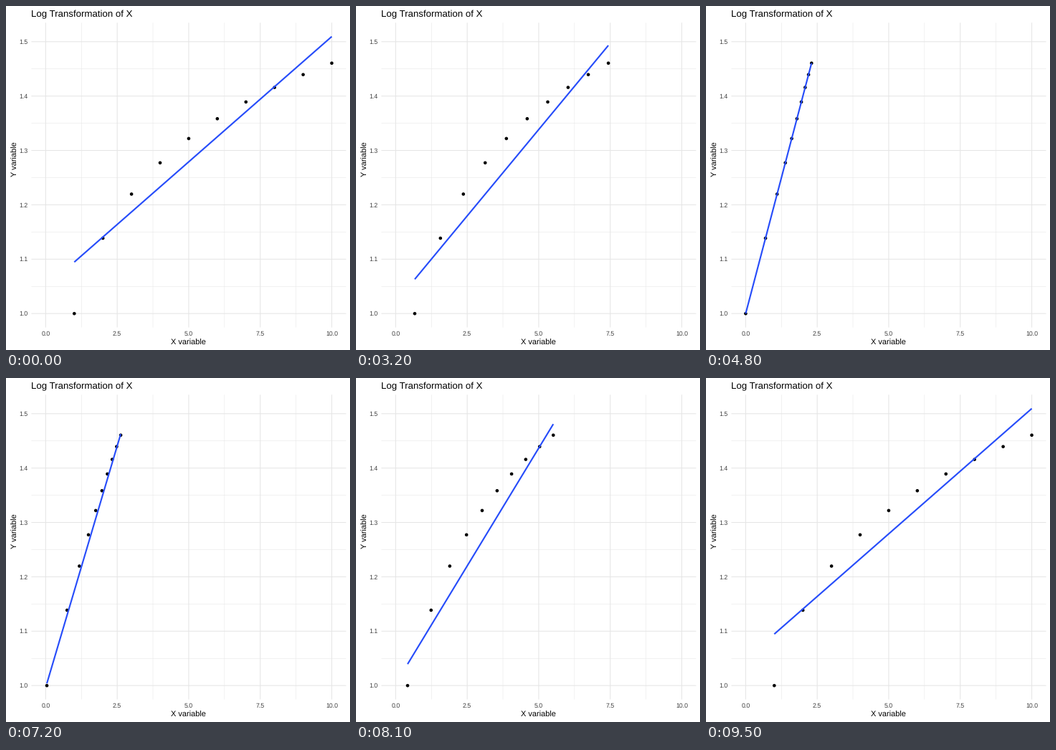
Animation of 480x480 px, one loop 10 s. Source, as a matplotlib script:

```python
import numpy as np
import matplotlib.pyplot as plt
from matplotlib.animation import FuncAnimation
from matplotlib.patches import Circle

SIZE, DPI = 480, 72
FRAMES, INTERVAL, STEPS = 100, 100, 24
LEFT, RIGHT, TOP, BOTTOM = 35.4, 474.5, 23.3, 448.5
BLUE, GRID, TICK = "#264cfa", "#e6e6e6", "#404040"

plt.rcParams["font.family"] = "Liberation Sans"
plt.rcParams["text.hinting"] = "none"

# Data: y is linear in log(x)
raw_x = np.arange(1, 11)
log_x = np.log(raw_x)
y = 1 + 0.2 * log_x
slope, intercept = np.polyfit(raw_x, y, 1)
raw_fit = intercept + slope * raw_x[[0, -1]]
log_fit = y[[0, -1]]


def px(v):
    pad = (RIGHT - LEFT) / 22
    return LEFT + pad + np.asarray(v) / 10 * 20 * pad


def py(v):
    pad = (BOTTOM - TOP) / 22
    return BOTTOM - pad - (np.asarray(v) - 1) / (raw_fit[1] - 1) * 20 * pad


fig = plt.figure(figsize=(SIZE / DPI, SIZE / DPI), dpi=DPI, facecolor="white")
ax = fig.add_axes([0, 0, 1, 1])
ax.set_xlim(0, SIZE)
ax.set_ylim(SIZE, 0)
ax.axis("off")


def grid_line(xs, ys, width):
    ax.plot(xs, ys, color=GRID, lw=width, snap=False,
            solid_capstyle="butt", zorder=1)


def label(x, y, text, size, color="black", ha="center", **kw):
    ax.text(x, y, text, fontsize=size, color=color, ha=ha, va="baseline", **kw)


def grid(xs, ys, width):
    for v in xs:
        grid_line([px(v)] * 2, [TOP, BOTTOM], width)
    for v in ys:
        grid_line([LEFT, RIGHT], [py(v)] * 2, width)


x_ticks = np.arange(0, 10.1, 2.5)
y_ticks = np.linspace(1, 1.5, 6)
grid(x_ticks[:-1] + 1.25, y_ticks[:-1] + 0.05, 0.53)
grid(x_ticks, y_ticks, 1.07)

for v in x_ticks:
    label(px(v), 459.8, f"{v:.1f}", 8.8, TICK)
for v in y_ticks:
    label(30.5, py(v) + 3.15, f"{v:.1f}", 8.8, TICK, ha="right")

label(LEFT, 15, "Log Transformation of X", 13.2, ha="left")
label((LEFT + RIGHT) / 2, 472.5, "X variable", 11)
label(13.2, (TOP + BOTTOM) / 2, "Y variable", 11, rotation=90)

dots = [ax.add_patch(Circle((0, 0), 2.3, fc="black", lw=0, snap=False, zorder=2))
        for _ in raw_x]
fit, = ax.plot([], [], color=BLUE, lw=2.13, snap=False,
               solid_capstyle="butt", zorder=3)


def ramp(i, start):
    return min(max((i - start) / STEPS, 0), 1)


def update(i):
    t = ramp(i, 24) - ramp(i, 71)
    xs = px(raw_x + (log_x - raw_x) * t)
    for dot, cx, cy in zip(dots, xs, py(y)):
        dot.center = cx, cy
    fit.set_data(xs[[0, -1]], py(raw_fit + (log_fit - raw_fit) * t))
    return [*dots, fit]


anim = FuncAnimation(fig, update, frames=FRAMES, interval=INTERVAL,
                     init_func=lambda: update(0), repeat=True, repeat_delay=0)
plt.show()
```
